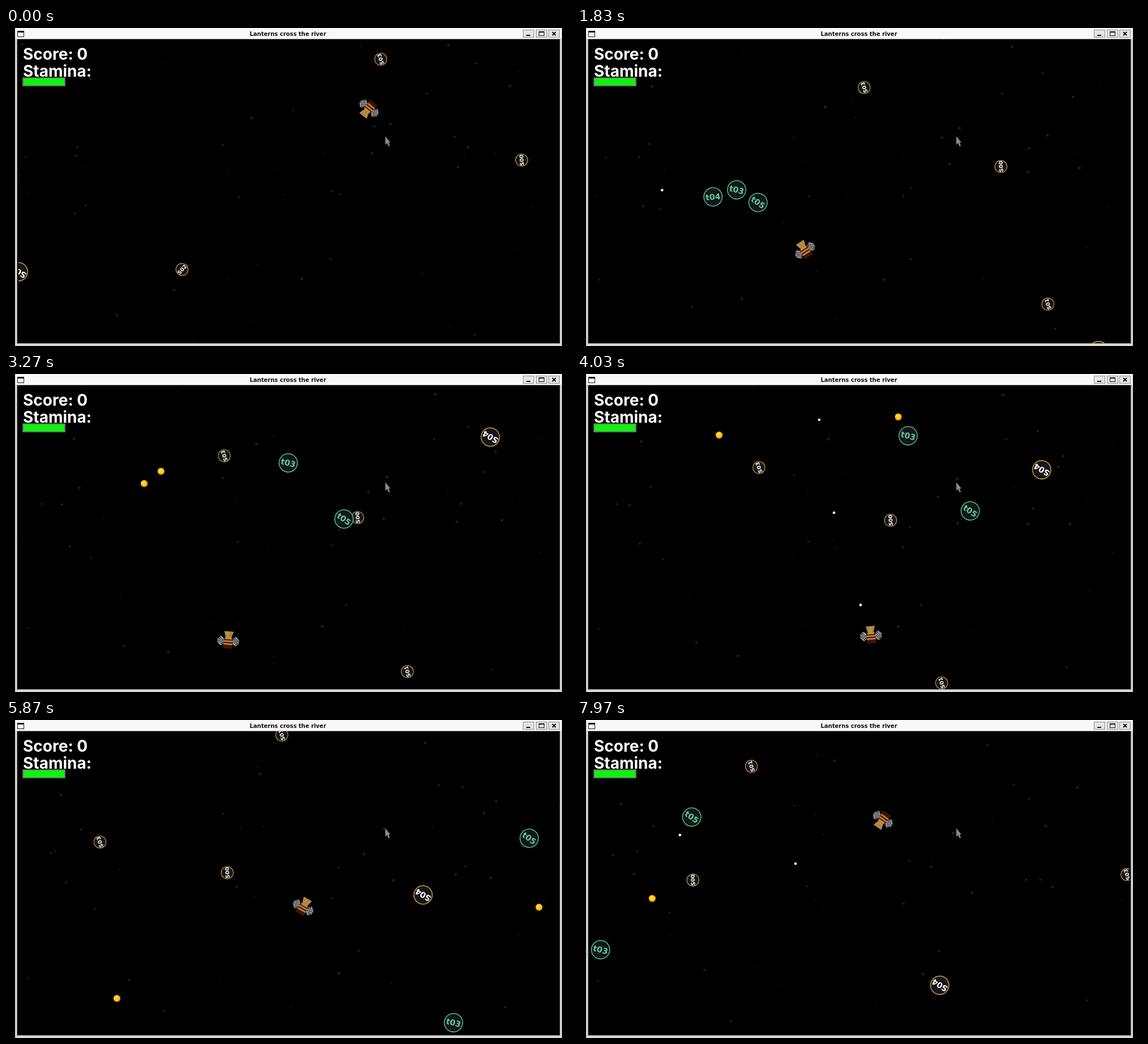
Recreate the animation shown at these times as an HTML page with a canvas. Size 998 by 561 pixels, loop 8 s.

```html
<!DOCTYPE html>
<html>
<head>
<meta charset="utf-8">
<style>
  html, body { margin: 0; width: 100%; height: 100%; overflow: hidden; background: #000; }
  canvas { display: block; width: 998px; height: 561px; }
</style>
</head>
<body>
<canvas width="998" height="561"></canvas>
<script>
const ctx = document.querySelector('canvas').getContext('2d');
const LOOP = 8000, BULLET_SPEED = .54, BULLET_LIFE = 900, BURST_DECAY = 430;
const SMALL = 11.3, LARGE = 17;
const RAD = Math.PI / 180;

// A body leaves `from` at time `start` with a steady velocity plus a burst that dies away.
const body = (from, velocity, more) => ({ from, velocity, burst: [0, 0], start: 0, end: LOOP, ...more });

// Asteroid labels are turned a quarter from the direction of travel.
const asteroid = (label, r, from, velocity, end = LOOP) => body(from, velocity, {
  end,
  draw: (x, y) => ball(x, y, r, label, Math.atan2(velocity[1], velocity[0]) + Math.PI / 2, '#d2a03a', '#fff')
});
const fragment = (label, angle, velocity, burst, end) => body([208, 334], velocity, {
  burst, start: 1580, end,
  draw: (x, y) => ball(x, y, LARGE, label, angle * RAD, '#4cc38a', '#62cc92')
});

const bodies = [
  asteroid('S00', SMALL, [911, 233], [-.0886, .0062]),
  asteroid('S01', SMALL, [988, 439], [-.0853, .0263]),
  asteroid('S02', SMALL, [311, 426], [-.0654, -.058], 1580),
  asteroid('S03', SMALL, [662, 55], [-.0845, .0273]),
  asteroid('S04', LARGE, [22, 430], [-.0457, .0759]),
  fragment('t03', 14, [.1115, -.0613], [104, -75]),
  fragment('t04', -5, [-.03, -.084], [90, -34], 2600),
  fragment('t05', 35, [.1245, -.0178], [182, -49]),
  body([187, 360], [-.865, -.154], { burst: [-28, -7], start: 2230, draw: coin }),
  body([294, 228], [-.03, -.084], { start: 2600, draw: coin })
];

// [time, x, y]
const beePath = [
  [0, 640, 143], [1070, 553, 294], [2470, 318, 449], [4030, 519, 460],
  [5030, 672, 401], [6730, 379, 255], [LOOP, 543, 175]
];
// [time, degrees clockwise from up]
const beeHeading = [
  [0, -141], [180, -92], [1070, -90], [2470, 15], [4030, -5],
  [5030, -30], [6730, 90], [7300, -70], [LOOP, -149]
];

const volley = (first, gap, count) => Array.from({ length: count }, (_, i) => first + i * gap);
const shots = [...volley(190, 225, 5), 2070, ...volley(3310, 310, 4), ...volley(7470, 260, 2)];

let seed = 11;
const random = (low, high) => low + (high - low) * (seed = seed * 16807 % 2147483647) / 2147483647;
const stars = Array.from({ length: 75 }, (_, i) => ({
  x: random(22, 976), y: random(24, 554),
  vx: random(-.0115, .0115), vy: random(-.0115, .0115),
  r: i % 5 < 2 ? random(1.7, 2.5) : random(.5, 1.2),
  color: i % 19 ? '#202020' : '#16164a'
}));

// Cubic Hermite interpolation with finite-difference tangents.
function smooth(keys, t) {
  const i = keys.findLastIndex((key, n) => n < keys.length - 1 && key[0] <= t);
  const a = keys[i], b = keys[i + 1], span = b[0] - a[0], u = (t - a[0]) / span, v = 1 - u;
  const before = keys[i - 1] || a, after = keys[i + 2] || b;
  return a.slice(1).map((p, k) => {
    const q = b[k + 1];
    const m = (q - before[k + 1]) / (b[0] - before[0]) * span;
    const n = (after[k + 1] - p) / (after[0] - a[0]) * span;
    return p * (1 + 2 * u) * v * v + q * u * u * (3 - 2 * u) + m * u * v * v - n * u * u * v;
  });
}

function linear(keys, t) {
  const i = keys.findLastIndex((key, n) => n < keys.length - 1 && key[0] <= t);
  const [t0, p] = keys[i], [t1, q] = keys[i + 1];
  return p + (q - p) * (t - t0) / (t1 - t0);
}

function wrap(x, y) {
  x = ((x - 7.5) % 983 + 983) % 983 + 7.5;
  while (y < 5.5) y += 538;
  while (y > 571) y -= 567;
  return [x, y];
}

function rect(x, y, w, h, color) {
  ctx.fillStyle = color;
  ctx.fillRect(x, y, w, h);
}

function disc(x, y, r, color) {
  ctx.fillStyle = color;
  ctx.beginPath();
  ctx.arc(x, y, r, 0, 7);
  ctx.fill();
}

function write(text, x, y, font, color, align = 'left') {
  ctx.font = font;
  ctx.fillStyle = color;
  ctx.textAlign = align;
  ctx.fillText(text, x, y);
}

function at(x, y, angle, draw) {
  ctx.save();
  ctx.translate(x, y);
  ctx.rotate(angle);
  draw();
  ctx.restore();
}

function ball(x, y, r, label, angle, ring, ink) {
  at(x, y, angle, () => {
    disc(0, 0, r, ring);
    disc(0, 0, r - (r === LARGE ? 1.5 : 1.1), '#15151c');
    const size = r * .83;
    write(label, 0, size * .36, `bold ${size}px "DejaVu Sans", sans-serif`, ink, 'center');
  });
}

function coin(x, y) {
  disc(x, y, 6.2, '#e89a08');
  disc(x - .4, y - .5, 5, '#ffc814');
  disc(x - 1.2, y - 1.5, 2.4, '#ffdf50');
}

function wing(side) {
  for (let i = -3; i < 3; i++) for (let j = -4; j < 4; j++) {
    const edge = Math.hypot((i + .5) / 3, (j + .5) / 4);
    if (edge > 1) continue;
    const color = edge > .7 ? '#8e8e94' : (i + j) % 2 ? '#d0d0d4' : '#38383c';
    rect(side * 13 + i * 2, 2 + j * 2, 2, 2, color);
  }
}

function bee(x, y, heading) {
  at(x, y, heading * RAD, () => {
    wing(-1);
    wing(1);
    rect(-8, -4, 16, 19, '#45200f');
    rect(-6, -4, 12, 3, '#bd8a3c');
    for (const y of [1, 6]) rect(-8, y, 16, 2.5, '#c8843a');
    rect(-7, 10, 14, 5, '#3a140c');
    for (let row = 0; row < 6; row++) {
      const half = 8 - row * .6;
      rect(-half, -15 + row * 2, half * 2, 2.1, '#be9244');
    }
  });
}

function drawShot(fired, t) {
  const age = t - fired;
  if (age < 0 || age > BULLET_LIFE) return;
  const [x, y] = smooth(beePath, fired), angle = linear(beeHeading, fired) * RAD;
  const distance = age * BULLET_SPEED;
  disc(x + Math.sin(angle) * distance, y - Math.cos(angle) * distance, 2.3, '#fff');
}

function drawBody({ from, velocity, burst, start, end, draw }, t) {
  if (t < start || t > end) return;
  const age = t - start, spent = 1 - Math.exp(-age / BURST_DECAY);
  draw(...wrap(...from.map((p, k) => p + velocity[k] * age + burst[k] * spent)));
}

function drawWindow() {
  rect(16, 0, 966, 561, '#d8d8da');
  rect(16, 0, 966, 19, '#f8f8f8');
  rect(19, 19, 960, 538, '#8c8c8c');
  rect(20, 20, 958, 536, '#000');
  write('Lanterns cross the river', 498, 13.5, 'bold 10px "DejaVu Sans", sans-serif', '#111', 'center');
  rect(20, 5, 12, 11, '#111');
  rect(21, 8, 10, 7, '#fff');
  for (const x of [913, 936, 958]) {
    rect(x, 3, 20, 14, '#8a8a8a');
    rect(x + 1, 4, 18, 12, '#e4e4e6');
  }
  rect(919, 12, 7, 2, '#111');
  rect(941, 6, 10, 8, '#111');
  rect(942, 8, 8, 5, '#e4e4e6');
  ctx.strokeStyle = '#111';
  ctx.lineWidth = 2;
  ctx.stroke(new Path2D('M965 7l6 6m0-6l-6 6'));
}

function drawHud() {
  const font = 'bold 28px Inter, sans-serif';
  write('Score: 0', 30, 56, font, '#fff');
  write('Stamina:', 30, 86, font, '#fff');
  rect(29.5, 87.5, 75, 15, '#c8c8c8');
  rect(30.5, 88.5, 73, 13, '#101810');
  rect(31, 89, 72, 12, '#0cf50c');
}

function frame() {
  const t = performance.now() % LOOP;
  rect(0, 0, 998, 561, '#000');
  drawWindow();

  ctx.save();
  ctx.beginPath();
  ctx.rect(22, 20, 954, 536);
  ctx.clip();
  for (const s of stars) disc(s.x + s.vx * t, s.y + s.vy * t, s.r, s.color);
  for (const b of bodies) drawBody(b, t);
  for (const fired of shots) drawShot(fired, t);
  bee(...smooth(beePath, t), linear(beeHeading, t));
  drawHud();
  ctx.fillStyle = '#8a8a8a';
  ctx.fill(new Path2D('M670 191v15l3-3 3 6 2-1-2-6h3z'));
  ctx.restore();
  requestAnimationFrame(frame);
}
frame();
</script>
</body>
</html>
```
